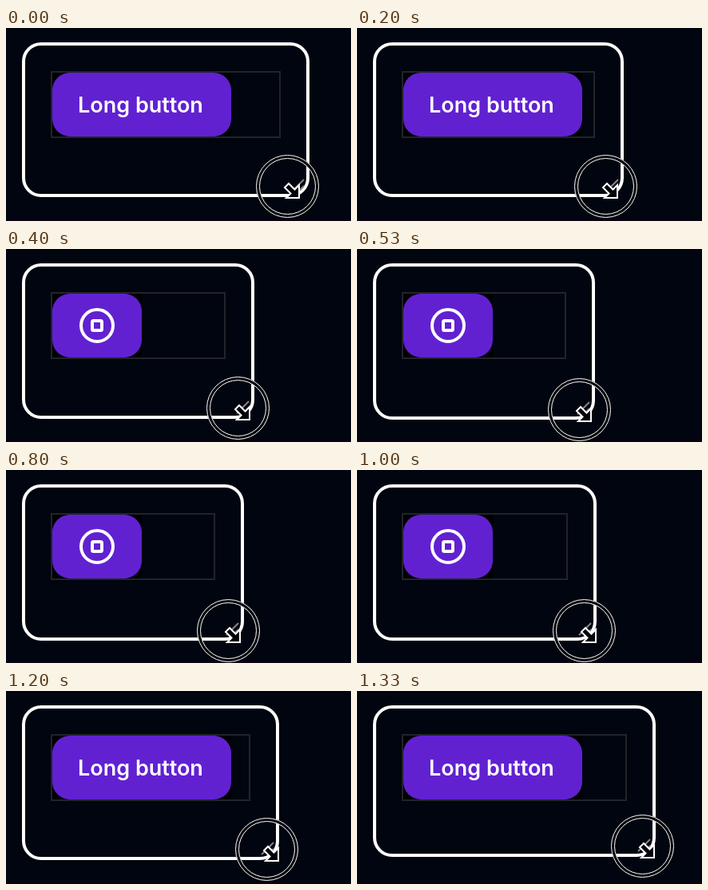
An HTML page for the animation above (1390 ms loop, 432 by 242 pixels).

```html
<!DOCTYPE html>
<html lang="en">
<head>
<meta charset="utf-8">
<title>Resizable container</title>
<style>
  html, body { margin: 0; width: 100%; height: 100%; overflow: hidden; background: #01050f; }
  svg { display: block; width: 432px; height: 242px; }
  text { font: 600 27px Inter, Roboto, sans-serif; font-optical-sizing: none; fill: #fff; }
  .line { fill: none; stroke: #fff; }
</style>
</head>
<body>
<svg viewBox="0 0 432 242">
  <rect width="432" height="242" fill="#01050f"/>
  <rect y="240" width="432" height="2" fill="#0b0212"/>
  <rect id="frame" class="line" x="22" y="20" rx="22" stroke-width="4"/>
  <path id="grip" d="M-22-7L-7-22M-14-7L-7-14" stroke="#858585" stroke-width="2"/>
  <rect id="slot" x="57" y="55" height="82" fill="none" stroke="#212429" stroke-width="2"/>
  <rect id="back" x="58" y="56" height="80" fill="#000"/>
  <rect id="button" x="58" y="56" height="80" rx="22" fill="#6121d1"/>
  <text id="label" x="90" y="106">Long button</text>
  <g id="icon" class="line" stroke-width="4">
    <circle cx="114" cy="96" r="20"/>
    <rect x="108" y="90" width="12" height="12" rx="1.5"/>
  </g>
  <g id="pointer">
    <circle r="37" fill="none" stroke="#01030a" stroke-width="5"/>
    <circle class="line" r="39"/>
    <circle class="line" r="35"/>
    <path d="M14.5-1.5V14.5H-1.5L4 9L-3.5 1.5L1.5-3.5L9 4Z" fill="#01030a" stroke="#fff" stroke-width="2"/>
  </g>
</svg>
<script>
  const LOOP = 1390, FPS = 15;
  // Key poses: tick, frame right edge, pointer x, pointer y
  const keys = [
    [0, 380, 352, 198],
    [3, 334, 311, 198],
    [5, 318, 296, 198],
    [8, 298, 278, 201],
    [14, 298, 278, 201],
    [15, 300, 284, 201],
    [17, 326, 311, 200],
    [20, 374, 357, 194]
  ];
  const $ = id => document.getElementById(id);
  const set = (id, key, value) => $(id).setAttribute(key, value);
  const move = (id, x, y) => set(id, 'transform', `translate(${x} ${y})`);
  const show = (id, on) => set(id, 'visibility', on ? 'visible' : 'hidden');

  // The motion advances in ticks, each starting on a 10 ms boundary.
  const tickAt = time => Math.floor((Math.floor(time / 10) * 10 + 5) * FPS / 1000);

  function pose(tick) {
    const i = Math.max(1, keys.findIndex(key => key[0] >= tick));
    const a = keys[i - 1], b = keys[i];
    const mix = (tick - a[0]) / (b[0] - a[0]);
    return a.map((v, k) => Math.round(v + (b[k] - v) * mix));
  }

  function draw(time) {
    const [, right, x, y] = pose(tickAt(time % LOOP));
    const bottom = Math.min(y + 14, 214);
    const fits = right - 38 >= 282;
    const width = fits ? 224 : 112;
    set('frame', 'width', right - 24);
    set('frame', 'height', bottom - 22);
    set('slot', 'width', right - 94);
    set('back', 'width', width);
    set('button', 'width', width);
    show('label', fits);
    show('icon', !fits);
    move('grip', right, bottom);
    move('pointer', x + 0.5, y + 0.5);
  }

  const start = performance.now();
  function run() {
    draw(performance.now() - start);
    requestAnimationFrame(run);
  }
  run();
</script>
</body>
</html>
```
